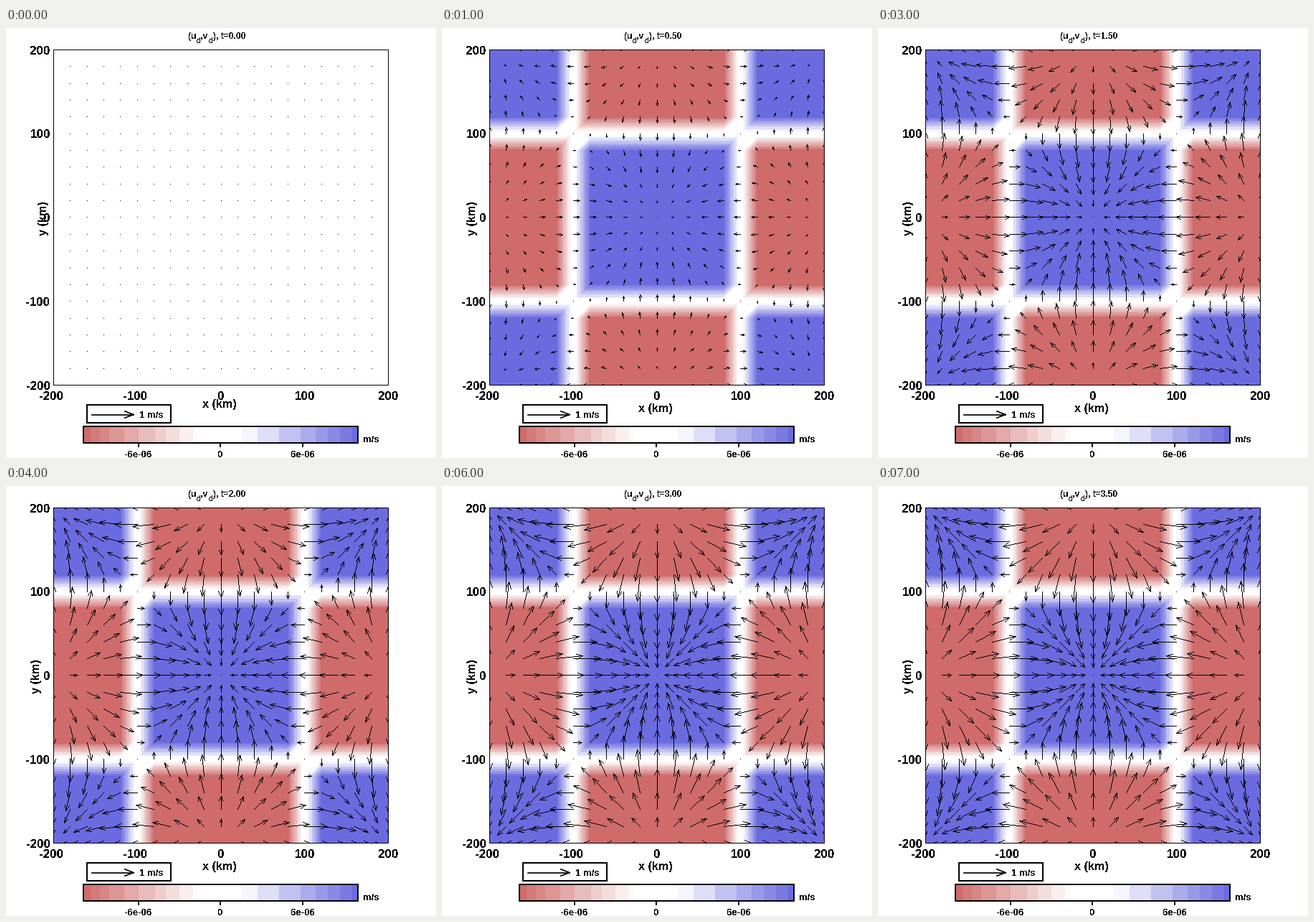
Animation of 600 by 599 pixels, one loop 8000 ms. Source, as a matplotlib script:

```python
import numpy as np
import matplotlib.pyplot as plt
from matplotlib.animation import FuncAnimation
from matplotlib.patches import Rectangle

W, H, DPI = 600, 599, 100
PT = 72 / DPI            # points per pixel
SCALE = 467 / 400        # pixels per km
CX, CY = 300, 264
LEFT, TOP, RIGHT, BOTTOM = 66, 30, 533, 497
RED, BLUE = np.array([207, 107, 107]), np.array([107, 107, 224])
RED_STEPS = [.155, .2, .3, .4, .48, .6, .7, .81, .88, .95]
BLUE_STEPS = [.155, .267, .424, .58, .69, .78, .87, .96]

plt.rcParams["font.family"] = "Liberation Sans"
plt.rcParams["text.antialiased"] = False

fig = plt.figure(figsize=(W / DPI, H / DPI), dpi=DPI, facecolor="white")
ax = fig.add_axes([0, 0, 1, 1])
ax.axis("off")


def ramp(mag, steps, end):
    """Stepped blend from white to the end colour."""
    mids = [0] + [(a + b) / 2 for a, b in zip(steps, steps[1:])] + [1]
    level = np.array(mids)[np.digitize(mag, steps)]
    mix = np.clip((level - .155) / .845, 0, 1)[..., None]
    return 255 + mix * (end - 255)


def shade(z):
    mag = np.abs(z)
    rgb = np.where(z[..., None] < 0, ramp(mag, RED_STEPS, RED),
                   ramp(mag, BLUE_STEPS, BLUE))
    return np.round(rgb).astype(np.uint8)


def vertical_speed(x, y):
    """Clipped cell pattern, interpolated over diagonal triangles."""
    p = np.clip((100 - np.abs(x)) / 20, -1, 1)
    q = np.clip((100 - np.abs(y)) / 20, -1, 1)
    a, b = np.abs(p), np.abs(q)
    dx = x - 100 * np.sign(x)
    dy = y - 100 * np.sign(y)
    mag = np.where(dx * dy > 0, np.minimum(a, b), np.maximum(0, a + b - 1))
    return np.sign(p * q) * mag


def show(rgb, extent, z=1):
    return ax.imshow(rgb, extent=extent, interpolation="nearest",
                     aspect="auto", zorder=z)


def label(x, y, s, size, weight="bold", ha="center", va="baseline", **kw):
    return ax.text(x, y, s, fontsize=size * PT, weight=weight,
                   ha=ha, va=va, color="black", **kw)


def middle(x, y, s, size, ha="center"):
    """Text whose digits are centred on y."""
    return label(x, y + .36 * size, s, size, ha=ha)


def box(x0, y0, x1, y1, lw):
    ax.add_patch(Rectangle((x0, y0), x1 - x0, y1 - y0, fill=False, ec="black",
                           lw=lw * PT, zorder=5, antialiased=False,
                           joinstyle="miter"))


def arrow(x, y, u, v):
    """Corner points of an arrow: tail, tip and the two wing ends."""
    size = np.hypot(u, v)
    head = np.minimum(.45 * size, 4 + .14 * size)
    wing = .38 * head
    ex, ey = u / size, v / size
    tx, ty = x + u, y + v
    bx, by = tx - head * ex, ty - head * ey
    return ((x, y), (tx, ty), (bx - wing * ey, by + wing * ex),
            (bx + wing * ey, by - wing * ex))


def to_pixel(x, y):
    return np.floor(x + .5).astype(int), np.ceil(y - .5).astype(int)


def stroke(ink, start, end):
    """Mark one-pixel-wide hard-edged lines inside the plot box."""
    (x0, y0), (x1, y1) = to_pixel(*start), to_pixel(*end)
    steps = np.maximum(np.maximum(np.abs(x1 - x0), np.abs(y1 - y0)), 1)
    k = np.minimum(np.arange(steps.max() + 1)[:, None] / steps, 1)
    px, py = to_pixel(x0 + k * (x1 - x0), y0 + k * (y1 - y0))
    inside = (px >= LEFT) & (px <= RIGHT) & (py >= TOP) & (py <= BOTTOM)
    ink[py[inside], px[inside], 3] = 255


# Coloured field
px, py = np.meshgrid(np.arange(LEFT, RIGHT + 1) + .5,
                     np.arange(TOP, BOTTOM + 1) + .5)
field = show(shade(vertical_speed((px - CX) / SCALE, (CY - py) / SCALE)),
             (LEFT, RIGHT + 1, BOTTOM + 1, TOP))
box(LEFT, TOP, RIGHT, BOTTOM, .99)

# Flow on a 20 km grid, in pixel indices
km = np.arange(-200, 201, 20)
gx, gy = (g.ravel() for g in np.meshgrid(km, km))
nx, ny = CX - .5 + gx * SCALE, CY - .5 - gy * SCALE
kx, ky = np.pi * gx / 200, np.pi * gy / 200
flow_u = -np.sin(kx) * np.cos(ky)
flow_v = -np.sin(ky) * np.cos(kx)
flow = show(np.zeros((H, W, 4), np.uint8), (0, W, H, 0), z=4)


def flow_image(amp):
    ink = np.zeros((H, W, 4), np.uint8)
    stroke(ink, (nx, ny), (nx, ny))
    u, v = amp * flow_u, -amp * flow_v
    on = np.hypot(u, v) > .5
    if on.any():
        tail, tip, wing_a, wing_b = arrow(nx[on], ny[on], u[on], v[on])
        for end in (tail, wing_a, wing_b):
            stroke(ink, end, tip)
    return ink


# Axis labels
for k in range(-200, 201, 100):
    middle(62, CY - k * SCALE, str(k), 17, ha="right")
    shift = -3 if k < 0 else 0
    middle(CX + k * SCALE + shift, 512, str(k), 17)
x_label = label(298, 535, "x (km)", 16.3)
y_label = label(42, 265, "y (km)", 16.3, va="center", rotation=90)

# Title
for x, s in ((254, "(u"), (271, ",v")):
    label(x, 15, s, 12, ha="left")
for x in (265.5, 282.5):
    label(x, 21, "d", 10, weight="normal", ha="left")
title = label(289, 15, "", 12, ha="left")

# Reference arrow
box(113, 525, 230, 550, 2)
tail, tip, wing_a, wing_b = arrow(120, 538.5, 58, 0)
for path in ((tail, tip), (wing_a, tip, wing_b)):
    ax.plot(*zip(*path), color="black", lw=1.7 * PT, zorder=5)
middle(203, 538, "1 m/s", 13.3)

# Colour bar
bar = (np.arange(108, 491) + .5 - 299.5) / 191.5
show(shade(bar[None, :]), (108, 491, 578, 555))
box(108, 555, 491, 578, 2)
for x, s in ((185, "-6e-06"), (299, "0"), (414, "6e-06")):
    ax.plot([x, x], [578, 583], color="black", lw=2 * PT, antialiased=False)
    middle(x, 593, s, 13.3)
middle(498, 572, "m/s", 13.3, ha="left")

ax.set_xlim(0, W)
ax.set_ylim(H, 0)


def draw(i):
    t = i / 2
    flow.set_data(flow_image(42 * np.sin(.45 * t)))
    field.set_visible(i > 0)
    title.set_text(f"), t={t:.2f}")
    x_label.set_y(535 if i else 529)
    y_label.set_x(42 if i else 53)
    return flow, field, title, x_label, y_label


anim = FuncAnimation(fig, draw, frames=8, interval=1000, repeat=True,
                     repeat_delay=0, blit=False)
plt.show()
```
